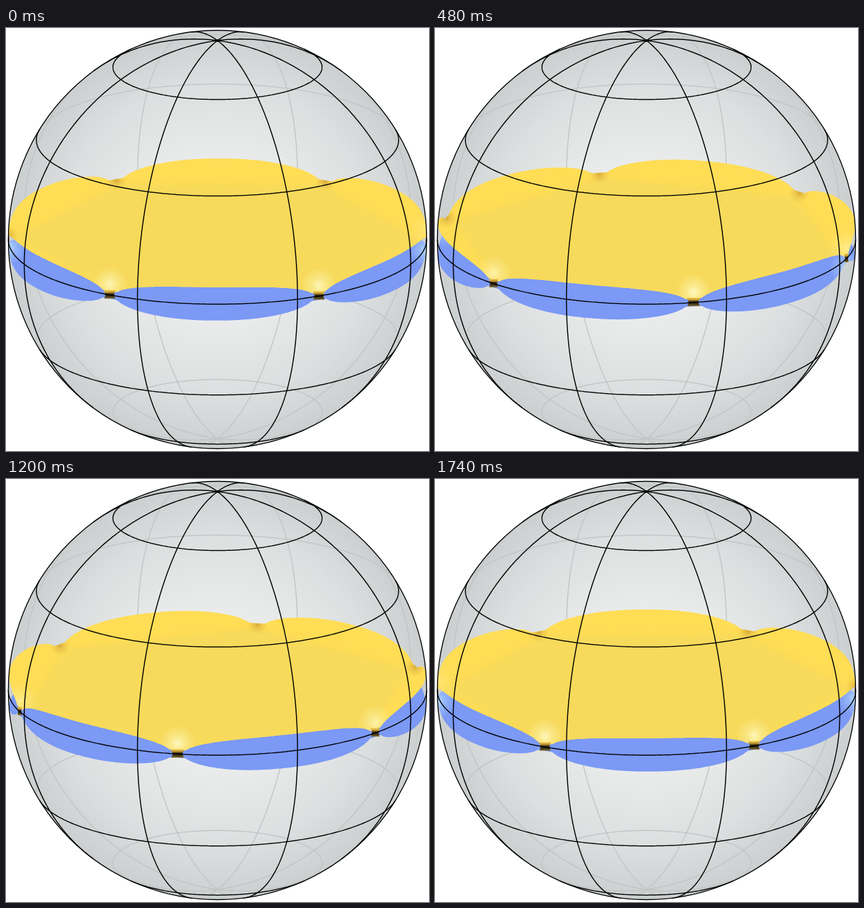
An HTML page with a canvas that plays this animation: 636x636 px, repeating every 1800 ms.

```html
<!DOCTYPE html>
<html>
<head>
<meta charset="utf-8">
<style>
html, body { margin: 0; width: 100%; height: 100%; overflow: hidden; background: #fff; }
canvas { display: block; }
</style>
</head>
<body>
<canvas id="stage" width="636" height="636"></canvas>
<script>
const ctx = document.getElementById('stage').getContext('2d');
const C = 318, R = 314.5, DEG = Math.PI / 180;
const sinT = Math.sin(18 * DEG), cosT = Math.cos(18 * DEG);

// Orthographic view of a point given by latitude and longitude in degrees
function project(lat, lon, r = R) {
  const a = lat * DEG, b = lon * DEG;
  const up = Math.sin(a), near = Math.cos(a) * Math.cos(b);
  return {
    x: C + r * Math.cos(a) * Math.sin(b),
    y: C + r * (sinT * near - cosT * up),
    z: up * sinT + near * cosT
  };
}

function trace(points) {
  const path = new Path2D();
  points.forEach(p => path.lineTo(p.x, p.y));
  path.closePath();
  return path;
}

// Split the graticule into its near and far halves
const nearLines = new Path2D(), farLines = new Path2D();
function addLine(at, from, to) {
  let last = at(from);
  for (let d = from + 1; d <= to; d++) {
    const p = at(d), path = p.z + last.z > 0 ? nearLines : farLines;
    path.moveTo(last.x, last.y);
    path.lineTo(p.x, p.y);
    last = p;
  }
}
for (let lat = -60; lat <= 60; lat += 30) addLine(d => project(lat, d), 0, 360);
for (let lon = 22.5; lon < 360; lon += 45) addLine(d => project(d, lon), -90, 90);

function gradient(g, ...stops) {
  stops.forEach(([at, color]) => g.addColorStop(at, color));
  return g;
}

function glow(x, y, radius, rgb, alpha) {
  ctx.fillStyle = gradient(ctx.createRadialGradient(x, y, 0, x, y, radius),
    [0, `rgba(${rgb},${alpha})`], [0.4, `rgba(${rgb},${alpha * 0.45})`], [1, `rgba(${rgb},0)`]);
  ctx.fillRect(x - radius, y - radius, 2 * radius, 2 * radius);
}

// Latitude of a sheet's rim; d is the angle from the middle of a lobe
function rim(d) {
  const u = Math.min(1, Math.abs(d) / 28.4);
  return Math.max(1.1, 4.8 * Math.sqrt(1 - u ** 2.4));
}

function sheet(side, turn) {
  const points = [];
  for (let d = 0; d < 360; d += 0.5)
    points.push(project(side * rim(d % 60 - 30), d + turn));
  return trace(points);
}

function clipped(path, draw) {
  ctx.save();
  ctx.clip(path);
  draw();
  ctx.restore();
}

function drawNeck(lon) {
  const p = project(0, lon), w = Math.max(0.15, Math.cos(lon * DEG));
  ctx.fillStyle = gradient(ctx.createLinearGradient(0, p.y - 8, 0, p.y + 6),
    [0, '#f6d454'], [0.28, '#c89c34'], [0.5, '#2b220c'], [0.7, '#3a3018'], [1, '#8d7532']);
  ctx.beginPath();
  ctx.moveTo(p.x - 11 * w, p.y - 7);
  ctx.quadraticCurveTo(p.x - 5 * w, p.y - 1, p.x - 10 * w, p.y + 5.5);
  ctx.lineTo(p.x + 10 * w, p.y + 5.5);
  ctx.quadraticCurveTo(p.x + 5 * w, p.y - 1, p.x + 11 * w, p.y - 7);
  ctx.fill();
}

function drawMembrane(turn) {
  const lower = sheet(-1, turn), upper = sheet(1, turn);
  const necks = [0, 60, 120, 180, 240, 300].map(d => d + turn);
  const facing = lon => Math.cos(lon * DEG);

  ctx.fillStyle = '#7b99f5';
  ctx.fill(lower);
  clipped(lower, () => necks.forEach(lon => {
    if (Math.abs(facing(lon)) < 0.32) {
      const p = project(0, lon);
      glow(p.x, p.y + 14, 26, '200,240,255', 0.8);
    }
  }));

  ctx.fillStyle = '#ffdd55';
  ctx.fill(upper);
  clipped(upper, () => {
    ctx.filter = 'blur(4px)';
    ctx.fillStyle = '#f7da5b';
    ctx.fill(trace(necks.map(lon => project(0.3, lon, R * 0.97))));
    ctx.filter = 'none';
    necks.forEach(lon => {
      const p = project(0, lon), f = facing(lon);
      if (f > 0) glow(p.x, p.y - 16, 27, '255,252,205', 0.3 + 0.6 * f);
      else glow(p.x, p.y - 4, 15, '176,122,32', 0.5);
    });
  });
  necks.filter(lon => facing(lon) > -0.05).forEach(drawNeck);
}

function strokeLines(path, color, width) {
  ctx.strokeStyle = color;
  ctx.lineWidth = width;
  ctx.stroke(path);
}

const ball = new Path2D();
ball.arc(C, C, R, 0, 2 * Math.PI);
const shade = gradient(ctx.createRadialGradient(C, C, 0, C, C, R),
  [0, '#f1f2f2'], [0.45, '#e8eaea'], [0.75, '#dcdfdf'], [1, '#cbcfcf']);

function frame(now) {
  const step = Math.floor(now / 60) % 30;
  ctx.clearRect(0, 0, 636, 636);
  ctx.fillStyle = shade;
  ctx.fill(ball);
  strokeLines(farLines, '#c1c4c4', 1.4);
  clipped(ball, () => drawMembrane(29 - 2 * step));
  strokeLines(nearLines, '#000', 1.5);
  strokeLines(ball, '#000', 1.4);
  ctx.fillStyle = '#000';
  const pole = project(90, 0);
  ctx.beginPath();
  ctx.arc(pole.x, pole.y, 2, 0, 2 * Math.PI);
  ctx.fill();
  requestAnimationFrame(frame);
}
requestAnimationFrame(frame);
</script>
</body>
</html>
```
